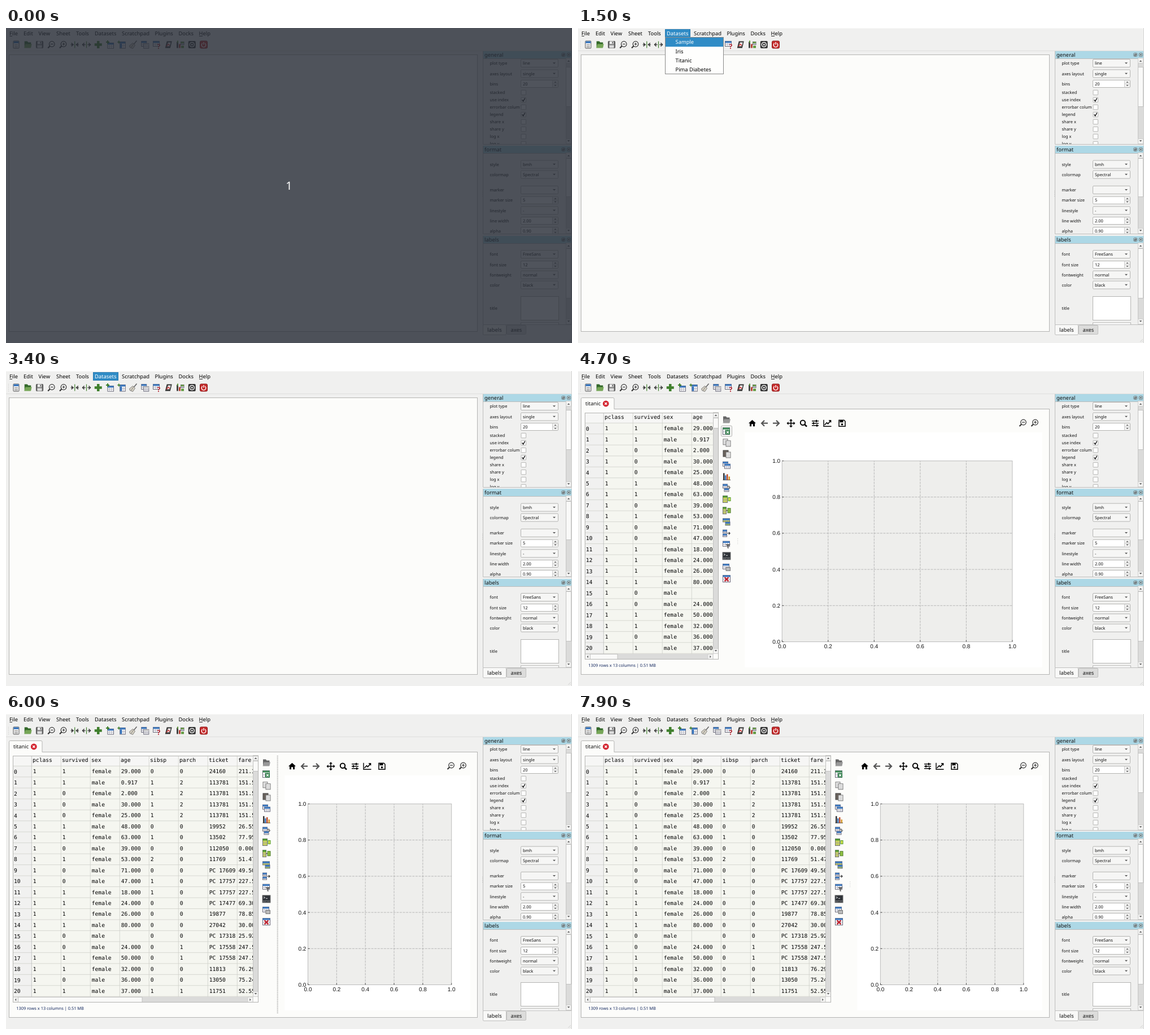
An HTML page that plays this animation: 1002x559 px, repeating every 8 s.

```html
<!DOCTYPE html>
<html lang="en">
<head>
<meta charset="utf-8">
<title>Data table application</title>
<style>
html, body { margin: 0; width: 100%; height: 100%; overflow: hidden; background: #f0f0ef; }
svg { display: block; }
text { font-family: "Noto Sans", "Open Sans", sans-serif; text-rendering: geometricPrecision; white-space: pre; }
.mono { font-family: "DejaVu Sans Mono", monospace; }
.tick { font-family: "Liberation Sans", sans-serif; }
</style>
</head>
<body>
<svg id="stage" width="1002" height="559" viewBox="0 0 1002 559"></svg>
<script>
const LOOP = 8000;
const BG = '#f0f0ef', PANE = '#fcfcfa', EDGE = '#b4b4b2', BLUE = '#308cc6', GREEN = '#3f7f2d', DARK = '#333';

// Hard steps: [time in ms, value]
const STEPS = {
  veil: [[0, 1], [100, 0]],
  title: [[0, 0], [1000, 1], [3600, 0]],
  popup: [[0, 0], [1000, 1], [3400, 0]],
  pick: [[0, -1], [1500, 0], [1800, 1], [2300, 2]],
  sheet: [[0, 0], [3600, 1]],
  side: [[0, -1], [4700, 1], [4900, 2], [5000, -1], [7000, 2], [7100, -1]],
  grip: [[0, 0], [5300, 1], [7000, 0]],
  shift: [[0, 0], [5700, .5], [5800, 1], [5900, 100], [6000, 198], [6100, 199]],
  tool: [[0, -1], [7300, 8], [7900, -1]],
};
const valueAt = (steps, t) => steps.filter(s => s[0] <= t).pop()[1];

// Drawing helpers
const rect = (x, y, w, h, fill = 'none', stroke = 'none', r = 0) =>
  `<rect x="${x}" y="${y}" width="${w}" height="${h}" rx="${r}" fill="${fill}" stroke="${stroke}"/>`;
const path = (d, stroke = DARK, w = 1, fill = 'none', extra = '') =>
  `<path d="${d}" stroke="${stroke}" stroke-width="${w}" fill="${fill}" ${extra}/>`;
const shape = (d, fill) => path(d, 'none', 0, fill);
const disc = (x, y, r, fill, stroke = 'none', w = 1) =>
  `<circle cx="${x}" cy="${y}" r="${r}" fill="${fill}" stroke="${stroke}" stroke-width="${w}"/>`;
const text = (x, y, s, size = 7.45, fill = '#111', extra = '') =>
  `<text x="${x}" y="${y}" font-size="${size}" fill="${fill}" ${extra}>${s}</text>`;
const move = (x, y, body) => `<g transform="translate(${x} ${y})">${body}</g>`;
const clip = (x, y, w, h, body) =>
  `<svg x="${x}" y="${y}" width="${w}" height="${h}" viewBox="${x} ${y} ${w} ${h}">${body}</svg>`;
const range = n => [...Array(n).keys()];
const arrow = (x, y, dir, r = 2.4, fill = '#555') => move(x, y,
  `<g transform="rotate(${{ up: 0, right: 90, down: 180, left: 270 }[dir]})">${shape(`M${-r} ${r / 2}L0 ${-r / 2}L${r} ${r / 2}z`, fill)}</g>`);
const hoverBox = (x, y) => rect(x - 9.5, y - 9.5, 19, 19, '#f6f6f5', EDGE, 2);

// Icons, centred on 0,0
const grid = (x, y, w, h, head = '#3b78c0', body = '#fff') =>
  rect(x, y, w, h, body, '#667') + rect(x, y, w, 3, head) +
  path(`M${x} ${y + h * .6}h${w}M${x + w / 3} ${y + 3}v${h - 3}M${x + w * 2 / 3} ${y + 3}v${h - 3}`, '#99a', .7);
const page = (x, y, fill = '#eee') =>
  rect(x, y, 8, 10, fill, '#777') + path(`M${x + 1.5} ${y + 3}h5m-5 2.5h5m-5 2.5h5`, '#aaa', .7);
const folder = (back, front) =>
  shape('M-6-6h5l1.5 2h5v9h-11.500z', back) + shape('M-4.500-1h11.500l-2 7h-11.500z', front);
const zoom = plus =>
  path('M-2 2L-6 6', DARK, 2.2) + disc(1, -1, 4.8, '#f8f8f7', DARK, 1.2) +
  path('M-1.500-1h5' + (plus ? 'M1-3.500v5' : ''), DARK, 1.2);
const cross = (r, color, w) => path(`M${-r} ${-r}L${r} ${r}M${r} ${-r}L${-r} ${r}`, color, w);
const squeeze = inward => {
  const a = inward ? -3 : -7, b = inward ? -6 : -4;
  return path('M0-6V6', GREEN, 1.2) + path('M-7 0h5M2 0h5', DARK, 1.4) +
    path(`M${b}-3L${a} 0L${b} 3M${-b}-3L${-a} 0L${-b} 3`, DARK, 1.4);
};
const plus = (r, w) => path(`M${-r} 0H${r}M0 ${-r}V${r}`, GREEN, w);

const toolIcons = [
  rect(-5, -6.5, 10, 13, '#f5f5f5', '#555', 1) + rect(-4.5, -6, 9, 3.5, '#3b78c0') + path('M-3 0h6m-6 2.500h6m-6 2h6', '#888', 1),
  folder('#33682a', '#76a657'),
  rect(-6, -6, 12, 12, '#777', '#444', 1) + rect(-3.5, -6, 7, 5, '#eee') + rect(-4, 1, 8, 5, '#ddd') + rect(1, -5, 1.5, 3, '#444'),
  zoom(false), zoom(true), squeeze(true), squeeze(false), plus(6.5, 4.5),
  grid(-4, -3, 10.5, 9.5) + move(-4, -4.5, plus(3, 2)),
  grid(-3, -5, 9.5, 11.5) + rect(-3, -2, 3.5, 8, '#3b78c0') + move(-5, -4.5, plus(2.5, 1.6)),
  path('M6-7L1-1', '#666', 1.6) + shape('M-1-3l4 4l-4 6l-5-2l-1-3z', '#d6d1c4') + path('M-1-3l4 4l-4 6l-5-2l-1-3zM0-1l-4 6', '#666', .8),
  grid(-6.5, -6, 9, 9) + grid(-2.5, -2, 9, 8.5, '#ccc', '#f4f4f4'),
  grid(-6.5, -6, 11, 9) + text(.5, 7, '?', 12, '#b3202c', 'font-weight="bold"'),
  shape('M-3-6h9l-3 12h-9z', '#333') + shape('M-1-4h5l-2 7h-5z', '#f2f2f2') + path('M-4 3l4-4l2 3', '#c33', 1.4),
  rect(-6.5, -5, 3, 11, '#444') + rect(-2.5, -1, 3, 7, '#b54235') + rect(-5.5, -7, 2, 4, '#5d973b') + grid(1, -5, 5.5, 5, '#6c9f45') + rect(1.5, 2, 5, 4, '#5d973b'),
  rect(-6.5, -6.5, 13, 13, '#333', 'none', 2) + disc(0, 0, 4, 'none', '#eee', 1.6) + disc(0, 0, 1.5, '#eee'),
  rect(-6.5, -6.5, 13, 13, '#c62b2b', '#8c1c1c', 2) + path('M-2.200-2.500a3.800 3.800 0 1 0 4.400 0M0-4.500v4.500', '#fff', 1.4),
];
const link = path('M1-3h4v4m-2-2l2 2l2-2', DARK, 1);
const sideIcons = [
  folder('#666', '#999'),
  grid(-6.5, -6, 12, 12, '#3d8a55') + move(2, 2, rect(-4, -4, 8, 8, '#2f7d48') + cross(2, '#fff', 1.4)),
  page(-6, -6) + page(-1, -3),
  rect(-6, -6, 9, 11, '#69625c', '#444') + page(-1, -3),
  grid(-6.5, -6, 9, 8) + grid(-3.5, -2, 10, 8),
  path('M-6.500 6H7', DARK, 1) + rect(-6, -6, 2.5, 12, '#333') + rect(-3, -2, 2.5, 8, '#3b78c0') + rect(0, -4, 2.5, 10, '#c4502c') + rect(3.5, 0, 2.5, 6, '#d39a2c'),
  grid(-6.5, -6.5, 8, 7) + grid(-4, 1, 8, 5.5) + link,
  grid(-6.5, -6, 8, 12, '#4f9b2e', '#d5e04b') + rect(3, -3, 4, 6, '#d5e04b', '#4f9b2e'),
  grid(-6.5, -6, 6, 12, '#4f9b2e', '#d5e04b') + rect(2, -4, 5, 8, '#8fc042', '#4f7b2e') + path('M-1 0h3', DARK, 1),
  grid(-6.5, -6, 12, 6, '#3b78c0', '#d5e04b') + grid(-2, 0, 8, 6, '#3b78c0', '#8fc042'),
  grid(-6.5, -6, 7, 5) + grid(-6.5, 1, 7, 5) + path('M1 0h5m-2-2l2 2l-2 2', DARK, 1.2),
  grid(-6.5, -6, 12, 9) + shape('M-2-1h9l-3.500 4v4l-2-1v-3z', '#666'),
  rect(-7, -6.5, 14, 13, '#2f3338', '#777') + path('M-5-4l2.500 1.500l-2.500 1.500M-1-1h3', '#eee', .9) + text(-6, 4.5, 'python', 3.7, '#bbb'),
  grid(-6.5, -6, 11, 9) + rect(-1, 0, 7.5, 6, '#bbb', '#777'),
  grid(-6.5, -6, 13, 12) + move(0, 1, cross(3.5, '#c02632', 2.4)),
];
const plotIcons = [
  [308.5, shape('M-6.500 0L0-6L6.500 0h-2v5.500h-3v-4h-3v4h-3v-5.500z', '#000')],
  [330, path('M6 0H-5M0-5L-5 0L0 5', '#555', 2.2)],
  [351, path('M-6 0H5M0-5L5 0L0 5', '#555', 2.2)],
  [377, path('M-6 0H6M0-6V6', '#000', 1.6) + ['up', 'right', 'down', 'left'].map((d, i) =>
    arrow([0, 6, 0, -6][i], [-6, 0, 6, 0][i], d, 3, '#000')).join('')],
  [399, disc(-1, -1, 4.2, 'none', '#000', 2) + path('M2 2L6 6', '#000', 2.6)],
  [420, path('M-6-4H6M-6 0H6M-6 4H6', '#000', 1.4) + path('M2-6v4M-3-2v4M3 2v4', '#000', 2)],
  [441.5, path('M-6.500-6V5.500H7', '#000', 1.4) + path('M-5 3L-1-1L1 1L6-5M2.500-5H6V-1.500', '#000', 1.6)],
  [467.5, path('M-5.500-5.500H3.500L5.500-3.500V5.500H-5.500z', '#000', 1.5) + rect(-4, -5, 6, 3.5, '#000') + disc(0, 2, 1.8, '#000')],
];

// Menus and toolbar
const MENUS = [['File', 6], ['Edit', 31], ['View', 57.5], ['Sheet', 89], ['Tools', 124], ['Datasets', 157],
  ['Scratchpad', 205], ['Plugins', 263.5], ['Docks', 305.5], ['Help', 341.5]];
const menuBar = on =>
  (on ? rect(154.5, 2.5, 44, 14, BLUE, '#2a7ab0') : '') +
  MENUS.map(([s, x]) => text(x, 13, s, 9.4, on && s == 'Datasets' ? '#fff' : '#000')).join('') +
  path('M6.500 14.500h4.500M342 14.500h6', '#000', .8);
const popup = pick => rect(154.5, 16.5, 103, 65, '#fefefd', '#8a8a89') +
  ['Sample', 'Iris', 'Titanic', 'Pima Diabetes'].map((s, i) =>
    (i == pick ? rect(155, 17 + i * 16.2, 102, 16.2, BLUE) : '') +
    text(172.5, 28.4 + i * 16.2, s, 9.4, i == pick ? '#fff' : '#000')).join('');
const toolX = i => 18 + i * 20.75;
const toolBar = hover => path('M0 40.500H1002', '#dededd') +
  path('M4.500 23V37', '#c8c8c7', 1, 'none', 'stroke-dasharray="1 2"') +
  (hover < 0 ? '' : hoverBox(toolX(hover), 29.2)) +
  toolIcons.map((icon, i) => move(toolX(i), 29.5, icon)).join('');

// Docks
const combo = (y, s) => rect(911.5, y - 7, 66, 14, '#f6f6f5', EDGE, 1.5) + text(915, y + 2.7, s, 7.5) + arrow(970.5, y, 'down', 2.6);
const spin = (y, s) => rect(911.5, y - 6.5, 66, 13, '#fff', EDGE, 1.5) + rect(968, y - 6, 9, 12, '#f2f2f1') +
  path(`M967.500 ${y - 6.5}v13M968 ${y}h9`, '#ccc') + text(915, y + 2.7, s, 7.5) + arrow(972.5, y - 3, 'up', 2.2) + arrow(972.5, y + 3, 'down', 2.2);
const check = (y, on) => rect(912, y - 4.2, 8.5, 8.5, '#fff', EDGE, .5) +
  (on ? path(`M913.700 ${y}l2 2.500l3-5.500`, '#111', 1.5) : '');
const field = (y, label, kind, value) => text(856.5, y + 2.7, label) + kind(y, value);
const scrollV = (x, top, bottom, from, to) =>
  rect(x, top, 10, bottom - top, '#dbdbda') + path(`M${x + .5} ${top}V${bottom}`, '#c4c4c3') +
  rect(x + .5, top - .5, 9, 9, '#f4f4f3', '#cfcfce') + rect(x + .5, bottom - 9.5, 9, 9, '#f4f4f3', '#cfcfce') +
  rect(x + .5, from + .5, 9, to - from, '#f9f9f8', '#c2c2c1') + arrow(x + 5, top + 4.5, 'up', 2.3) + arrow(x + 5, bottom - 5.5, 'down', 2.3);
const dock = (y, end, name, from, to, body) =>
  rect(845, y, 156, 13, '#add8e6') + text(847, y + 9.6, name, 9.4) +
  [986.8, 996.3].map((x, i) => move(x, y + 6.5, rect(-3, -3, 6, 6, '#c4dfe7', '#6d8288', 1.5) +
    (i ? cross(1.6, DARK, 1) : rect(-1.5, -.5, 2.5, 2, 'none', '#555') + path('M-.500-1.500h2v2', '#555', .7)))).join('') +
  clip(845, y + 13, 146, end - y - 13, body) + scrollV(991, y + 13, end, from, to) +
  path(`M844.500 ${y}V${end + .5}H1001M845 ${y + 13.5}H991`, '#bdbdbc');

const general = field(62.5, 'plot type', combo, 'line') + field(81, 'axes layout', combo, 'single') + field(99, 'bins', spin, '20') +
  ['stacked', 'use index', 'errorbar colum', 'legend', 'share x', 'share y', 'log x', 'log y'].map((s, i) =>
    field(114.5 + i * 13, s, check, i == 1 || i == 3)).join('');
const format = field(242, 'style', combo, 'bmh') + field(260, 'colormap', combo, 'Spectral') + field(287.3, 'marker', combo, '') +
  field(305.7, 'marker size', spin, '5') + field(323.8, 'linestyle', combo, '-') + field(342, 'line width', spin, '2.00') + field(360, 'alpha', spin, '0.90');
const labels = field(401.5, 'font', combo, 'FreeSans') + field(420, 'font size', spin, '12') + field(438, 'fontweight', combo, 'normal') +
  field(456, 'color', combo, 'black') + text(856.5, 500.2, 'title') + rect(911.5, 476.5, 67, 42, '#fff', EDGE) + rect(911.5, 523, 67, 20, '#fff', EDGE);
const docks = dock(41, 206, 'general', 69, 139, general) + dock(209, 365, 'format', 231, 299, format) + dock(369, 526, 'labels', 391, 479, labels) +
  rect(886.5, 527.5, 34, 16, '#dcdcdb', '#c0c0bf', 1.5) + rect(844.5, 526.5, 41, 18, '#f8f8f7', '#c0c0bf', 1.5) +
  text(852, 539.2, 'labels', 9.4) + text(893.5, 538.6, 'axes', 9.4) +
  path('M843.500 289v10', '#c8c8c7', 1, 'none', 'stroke-dasharray="1 2"') + path('M995 557l5-5M998 557l2-2', '#d2d2d1');

// Table
const list = s => s.split(',');
const COLS = [
  ['pclass', '1'.repeat(21)],
  ['survived', '110001101001111001101'],
  ['sex', [...'fmfmfmfmfmmfffmmmffmm'].map(c => c == 'f' ? 'female' : 'male')],
  ['age', list('29,.917,2,30,25,48,63,39,53,71,47,18,24,26,80,,24,50,32,36,37').map(v => v && (+v).toFixed(3))],
  ['sibsp', '011110102011000000001'],
  ['parch', '022220000000000011001'],
  ['ticket', list('24160,113781,113781,113781,113781,19952,13502,112050,11769,PC 17609,PC 17757,PC 17757,PC 17477,19877,27042,PC 17318,PC 17558,PC 17558,11813,13050,11751')],
  ['fare', list('211.3,151.5,151.5,151.5,151.5,26.55,77.95,0.000,51.47,49.50,227.5,227.5,69.30,78.85,30.00,25.92,247.5,247.5,76.29,75.24,52.55')],
];
const ROW = 19.475, colX = i => 45.3 + i * 52;
const mono = (x, y, s) => text(x, y, s, 9.68, '#000', 'class="mono"');
const rowY = i => 105.3 + i * ROW;
const cells = rect(45, 92, 420, 410, '#f5f6f0') + rect(12, 74, 453, 18, '#f6f6f5') + rect(12, 92, 33, 410, '#f1f1f0') +
  range(22).map(i => path(`M13 ${92.3 + i * ROW}H465`, '#cfd0ca', .8)).join('') +
  COLS.map(([name, data], c) => path(`M${colX(c)} 74V502`, c ? '#cfd0ca' : '#bbb', .8) + mono(colX(c) + 1.7, 85.2, name) +
    [...data].map((v, i) => mono(colX(c) + 2.4, rowY(i), v)).join('')).join('') +
  range(21).map(i => mono(14, rowY(i) + .3, i)).join('');
const table = s => clip(12, 74, 227 + s, 428, cells) +
  scrollV(239 + s, 74, 502, 83, 101) +
  rect(12.5, 502, 227 + s, 9.5, '#dbdbda') + rect(12.5, 502.5, 9, 9, '#f4f4f3', '#cfcfce') + rect(230 + s, 502.5, 9, 9, '#f4f4f3', '#cfcfce') +
  rect(21.5, 502.5, 48.5 + s * .864, 9, '#f9f9f8', '#c2c2c1') + arrow(17, 507, 'left', 2.3) + arrow(234.5 + s, 507, 'right', 2.3) +
  rect(12.5, 74.5, 236 + s, 437, 'none', EDGE) +
  text(18.3, 525.4, '1309 rows x 13 columns | 0.51 MB', 7.43, '#14285f');

// Plot, laid out as fractions of the figure width
function plot(s) {
  const x0 = 295.5 + s, w = 821.5 - x0, left = x0 + w * .125, right = x0 + w * .9, top = 159.5, bottom = 480.5;
  const label = (x, y, v, anchor) => text(x, y, v.toFixed(1), 10, '#111', `class="tick" text-anchor="${anchor}"`);
  const ticks = range(6).map(i => {
    const v = i / 5, x = left + (right - left) * v, y = bottom + (top - bottom) * v;
    const lines = i % 5 ? path(`M${x} ${bottom}V${top}M${left} ${y}H${right}`, '#b2b2b2', .9, 'none', 'stroke-dasharray="4 1.600"') : '';
    return lines + path(`M${x} ${bottom}v-3M${left} ${y}h3`, '#333', .8) +
      label(x, 491.6, v, 'middle') + label(left - 3.2, y + 3.5, v, 'end');
  }).join('');
  return rect(x0, 109, w, 417, '#fff') + rect(left, top, right - left, bottom - top, '#eeeeec', '#bcbcbc') + ticks +
    plotIcons.map(([x, icon]) => move(x + s, 92.7, icon)).join('') + move(787.5, 92, zoom(false)) + move(808.5, 92, zoom(true));
}

const sideY = i => 86.5 + i * 20.15;
const splitter = (x, on) => on
  ? path(`M${x} 74V532`, '#a2a2a0', 2, 'none', 'stroke-dasharray="1 1.400"')
  : path(`M${x} 297v10`, '#c8c8c7', 1, 'none', 'stroke-dasharray="1 2"');
const sheet = ({ shift, side, grip }) =>
  rect(5.5, 67.5, 829, 471, PANE, EDGE) + path('M5.500 68.500V49.500q0-2 2-2H62q2 0 2 2V67.500', EDGE, 1, PANE) +
  path('M6 68H63.500', PANE, 2) + text(13, 61.3, 'titanic', 9.4) +
  move(49.3, 58, disc(0, 0, 5.4, '#d3242f') + cross(2, '#fff', 1.5)) +
  table(shift) + plot(shift) + splitter(282.7 + shift, grip) +
  move(263 + shift, 0, (side < 0 ? '' : hoverBox(0, sideY(side))) + sideIcons.map((icon, i) => move(0, sideY(i), icon)).join(''));

const veil = `<g>${rect(0, 0, 1002, 559, 'rgba(40,45,55,.81)')}${text(501, 286.8, '1', 20, '#fff', 'text-anchor="middle"')}</g>`;

const scene = s => rect(0, 0, 1002, 559, BG) + path('M0 .500H1002', '#fafaf9') + path('M1001.500 0V559', '#d4d4d3') +
  toolBar(s.tool) + menuBar(s.title) + docks +
  (s.sheet ? sheet(s) : rect(5.5, 47.5, 829, 491, PANE, EDGE)) +
  (s.popup ? popup(s.pick) : '') + (s.veil ? veil : '');

const stage = document.getElementById('stage');
const start = performance.now();
let shown = '';
function frame() {
  const t = (performance.now() - start) % LOOP;
  const state = Object.fromEntries(Object.entries(STEPS).map(([k, steps]) => [k, valueAt(steps, t)]));
  const key = JSON.stringify(state);
  if (key != shown) {
    stage.innerHTML = scene(state);
    shown = key;
  }
  requestAnimationFrame(frame);
}
frame();
</script>
</body>
</html>
```
